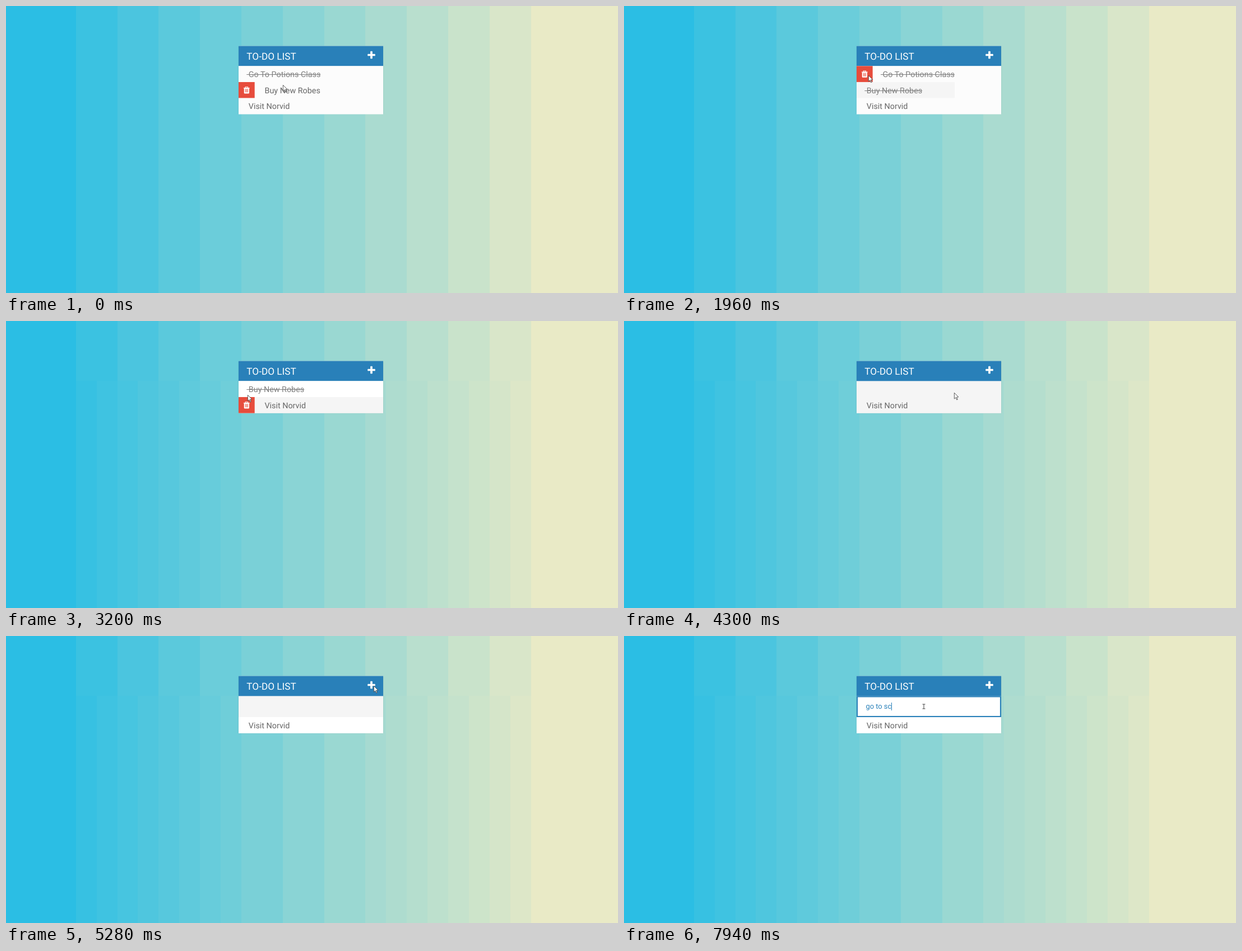
An HTML page with a canvas that plays this animation: 1092x513 px, repeating every 8000 ms.

```html
<!DOCTYPE html>
<html lang="en">
<head>
<meta charset="utf-8">
<title>To-Do List</title>
<style>
  html, body { margin: 0; width: 100%; height: 100%; overflow: hidden; background: #2bc0e4; }
  canvas { display: block; }
</style>
</head>
<body>
<canvas id="stage" width="1092" height="513"></canvas>
<script>
const ctx = document.getElementById('stage').getContext('2d');
ctx.textRendering = 'geometricPrecision';

const LOOP = 8000, W = 1092, H = 513;
const LEFT = 415, WIDTH = 258, HEAD = 71.5, LIST = 107.3, ROW = 28.67, INPUT = 37.7;
const FONT = 'Roboto, Arial, sans-serif';
const BLUE = '#2980b9', GREY = '#f5f5f5';
const TYPED = 'go to sc';

// Moments of the main actions
const CHECK = 570, TO_FIRST = 1340, DELETE_1 = 2390, DROP_1 = 2870, TO_LAST = 2900, TO_TOP = 3340,
  DELETE_2 = 3870, DROP_2 = 4440, OPEN = 5280, FOCUS = 5920, TYPE = 6720;

// Pointer stops: [time, x, y]
const STOPS = [[0, 494, 141], [850, 506, 143], [1250, 470, 140], [1680, 436, 124], [2720, 436, 123],
  [3000, 431, 144], [3200, 431, 132], [3500, 431, 125], [3870, 431, 125], [4290, 589, 128],
  [4420, 589, 128], [4850, 656, 89], [5420, 656, 89], [5880, 535, 126]];

const ramp = (t, start, length) => Math.min(1, Math.max(0, (t - start) / length));
const slide = (t, start) => ramp(t, start, 200);
const mix = (a, b, k) => a + (b - a) * k;

function rect(x, y, w, h, color) {
  ctx.fillStyle = color;
  ctx.fillRect(x, y, w, h);
}

function write(text, x, y, size, color) {
  ctx.font = `${size}px ${FONT}`;
  ctx.fillStyle = color;
  ctx.fillText(text, x, y);
  return ctx.measureText(text).width;
}

function shade(x) {
  const k = Math.min(1, Math.max(0, (x - 85) / 890));
  const rgb = [mix(43, 233, k), mix(190, 234, k), mix(228, 198, k)].map(Math.round);
  return `rgb(${rgb})`;
}

// Even gradient bands; the fine version halves those outside the middle
function bands(top, fine) {
  const edge = k => Math.round(936.5 - 36.9 * k);
  rect(0, top, W, H - top, shade(0));
  for (let k = 22, step; k > 0; k -= step) {
    step = fine && Math.abs(k - 11.5) > 3 ? 1 : 2;
    rect(edge(k), top, W, H - top, shade((edge(k) + edge(k - step)) / 2));
  }
  rect(edge(0), top, W, H - top, shade(W));
}

function trash(cx, cy) {
  ctx.save();
  ctx.translate(cx, cy);
  ctx.beginPath();
  ctx.roundRect(-4.6, -3.5, 9.2, 9.7, [0, 0, 1.3, 1.3]);
  for (const x of [-2, 0, 2]) ctx.rect(x - .5, -2, 1, 6);
  ctx.fillStyle = '#fff';
  ctx.fill('evenodd');
  ctx.fillRect(-5.6, -4.1, 11.2, 1);
  ctx.strokeStyle = '#fff';
  ctx.strokeRect(-2.3, -5.6, 4.6, 2);
  ctx.restore();
}

function plus(cx, cy) {
  ctx.beginPath();
  ctx.roundRect(cx - 6.75, cy - 1.85, 13.5, 3.7, .9);
  ctx.roundRect(cx - 1.85, cy - 6.75, 3.7, 13.5, .9);
  ctx.fillStyle = '#fff';
  ctx.fill();
}

function row(y, item, bg) {
  ctx.save();
  ctx.globalAlpha = item.alpha;
  rect(LEFT, y, WIDTH, ROW, bg);
  if (item.tint) rect(LEFT, y, 175, ROW, GREY);
  const slot = ROW * item.open, x = LEFT + slot + 14.3, base = y + 19.6;
  const color = item.done ? '#808080' : '#666';
  const width = write(item.text, x + 3.5, base, 14.33, color);
  if (item.done) rect(x, Math.round(base - 5), width + 3.5, 1, color);
  if (slot > 0) {
    ctx.globalAlpha = item.alpha * item.open;
    rect(LEFT, y, slot, ROW, '#e74c3c');
    trash(LEFT + slot / 2, y + ROW / 2);
  }
  ctx.restore();
}

function items(t) {
  const first = slide(t, TO_FIRST), top = slide(t, TO_TOP);
  return [
    { text: 'Go To Potions Class', done: true, open: first, alpha: 1 - ramp(t, DELETE_1, 460), end: DROP_1 },
    { text: 'Buy New Robes', done: t >= CHECK, tint: t >= 1400 && t < DELETE_1,
      open: 1 - first + top - slide(t, DELETE_2), alpha: 1 - ramp(t, DELETE_2, 410), end: DROP_2 },
    { text: 'Visit Norvid', done: false, open: slide(t, TO_LAST) - top, alpha: 1, end: LOOP }
  ].filter(item => t < item.end);
}

// Three keys per burst
const keyTime = i => TYPE + 530 * Math.floor(i / 3) + 125 * (i % 3);

function field(t) {
  const x = LEFT + 16.4, base = 130.2, focused = t >= FOCUS;
  if (focused) {
    rect(LEFT, LIST, WIDTH, INPUT, BLUE);
    rect(LEFT + 2.1, LIST + 2.1, WIDTH - 4.2, INPUT - 4.2, '#fff');
  }
  const typed = [...TYPED].filter((c, i) => t >= keyTime(i)).join('');
  let caret = x;
  if (typed) {
    caret += write(typed, x, base, 12.9, BLUE);
  } else {
    ctx.globalAlpha = ramp(t, OPEN, 400);
    write('Add New Todo', x, base, 12.9, '#a9a9a9');
    ctx.globalAlpha = 1;
  }
  const blink = t >= FOCUS + 520 && t < TYPE;
  if (focused && !blink) rect(Math.floor(caret), 119, 1, 14, BLUE);
}

function beam() {
  rect(-.5, -4, 1, 8, '#444');
  for (const y of [-4.5, 3.5]) rect(-2.5, y, 5, 1, '#444');
}

function arrow() {
  ctx.scale(.717, .717);
  ctx.beginPath();
  for (const [x, y] of [[.5, .5], [.5, 15.5], [4, 12.2], [6.6, 18], [8.8, 17], [6.3, 11.3], [11, 11]]) ctx.lineTo(x, y);
  ctx.closePath();
  ctx.fillStyle = '#fff';
  ctx.fill();
  ctx.strokeStyle = '#444';
  ctx.lineWidth = 1.2;
  ctx.stroke();
}

function pointer(t) {
  const next = STOPS.findIndex(stop => stop[0] > t);
  const i = next < 0 ? STOPS.length - 1 : next;
  const [t0, x0, y0] = STOPS[i - 1], [t1, x1, y1] = STOPS[i];
  const k = ramp(t, t0, t1 - t0), eased = k * k * (3 - 2 * k);
  ctx.save();
  ctx.translate(mix(x0, x1, eased), mix(y0, y1, eased));
  if (t >= FOCUS - 160) beam();
  else arrow();
  ctx.restore();
}

function draw(t) {
  bands(0, false);
  if (t >= DROP_1) bands(107, true);

  const list = items(t), open = t >= OPEN;
  const first = LIST + (open ? INPUT : 0);

  ctx.save();
  ctx.shadowColor = 'rgba(0,0,0,.12)';
  ctx.shadowBlur = 2.2;
  rect(LEFT, HEAD, WIDTH, first + list.length * ROW - HEAD, GREY);
  ctx.restore();

  rect(LEFT, HEAD, WIDTH, LIST - HEAD, BLUE);
  write('TO-DO LIST', LEFT + 14.3, 95.5, 17.2, '#fff');
  plus(652, 87.5);

  if (open) field(t);
  list.forEach((item, i) => {
    const bg = t < DELETE_1 ? '#fcfcfc' : i % 2 ? GREY : '#fff';
    row(first + i * ROW, item, bg);
  });
  pointer(t);
}

function tick() {
  draw(performance.now() % LOOP);
  requestAnimationFrame(tick);
}
tick();
</script>
</body>
</html>
```
